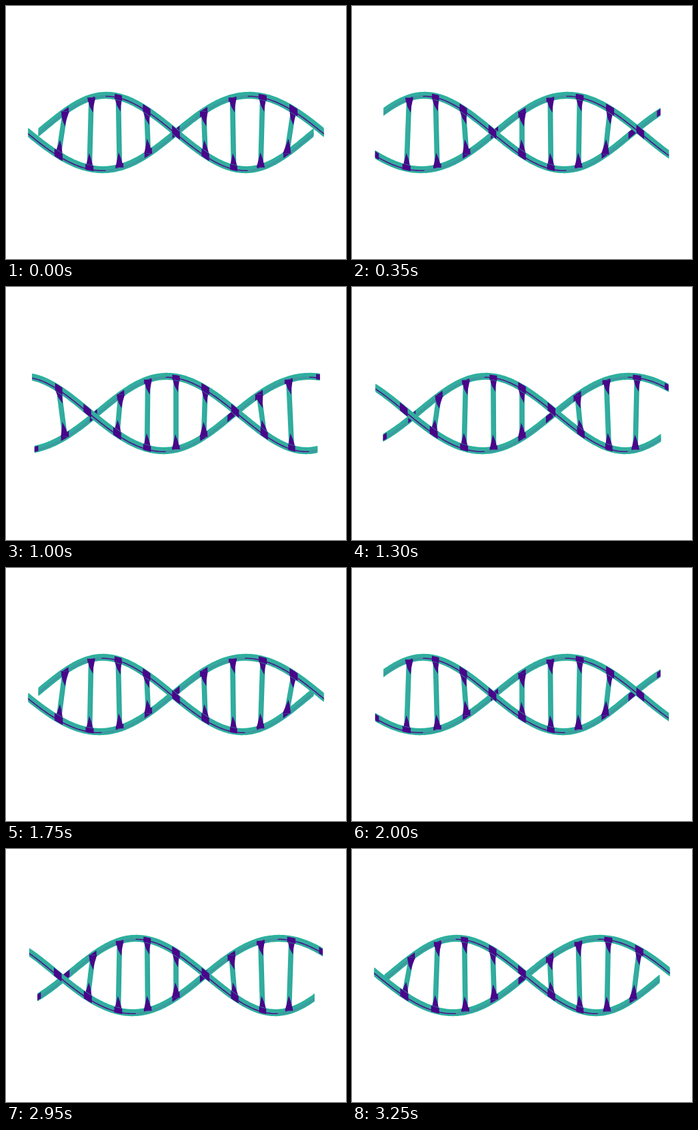
Write an HTML page with a canvas that moves like this. It is 498x371 px and loops after 3.3 s.

```html
<!DOCTYPE html>
<html lang="en">
<head>
<meta charset="utf-8">
<title>Rotating double helix</title>
<style>
html, body { margin: 0; width: 100%; height: 100%; overflow: hidden; background: #fff; }
canvas { display: block; }
</style>
</head>
<body>
<canvas id="stage" width="498" height="371"></canvas>
<script>
const ctx = document.getElementById('stage').getContext('2d');

const LOOP = 3300, STEP = 50;
const CX = 249, CY = 185.5;
const LENGTH = 418, HALF = LENGTH / 2, PITCH = LENGTH / 10;
const RADIUS = 54.5, TUBE = 5.1, DEPTH = 0.036;
const K = 2 * Math.PI / LENGTH;
const TEAL = '#32ad9f', EDGE = '#27b59c', SHADE = '#3d9a9f', PURPLE = '#48068a';

// time in ms, distance the wave has travelled to the left
const TRAVEL = [[0, 0], [700, 81], [1300, 160], [1750, 214], [2000, 251], [2600, 331], [LOOP, LENGTH]];

function travelAt(t) {
  const i = TRAVEL.findIndex(key => key[0] > t);
  const [t0, d0] = TRAVEL[i - 1], [t1, d1] = TRAVEL[i];
  return d0 + (d1 - d0) * (t - t0) / (t1 - t0);
}

// Point of a strand (0 or 1) at axis position s, seen in perspective
function project(s, strand, travel) {
  const a = K * (s + travel) + strand * Math.PI;
  const sin = Math.sin(a), cos = Math.cos(a);
  const p = 1 + DEPTH * cos;
  const slope = RADIUS * K * cos;
  return {
    x: CX + s * p,
    y: CY + RADIUS * sin * p,
    h: TUBE * p * Math.sqrt(1 + slope * slope),
    sin, cos
  };
}

const isFront = p => p.cos >= 0;

function polygon(points, color) {
  ctx.fillStyle = color;
  ctx.beginPath();
  points.forEach(([x, y]) => ctx.lineTo(x, y));
  ctx.fill();
}

// Fills a ribbon between two offsets, given as fractions of the tube's half height
function band(points, from, to, color) {
  const side = f => points.map(p => [p.x, p.y + p.h * f]);
  polygon([...side(from), ...side(to).reverse()], color);
}

function sample(from, to, strand, travel) {
  const points = [];
  const n = Math.ceil((to - from) / 2);
  for (let i = 0; i <= n; i++) points.push(project(from + (to - from) * i / n, strand, travel));
  return points;
}

function drawRun(run, front) {
  if (run.length < 2) return;
  band(run, -1, 1, EDGE);
  band(run, -0.8, 0.8, TEAL);
  band(run, 0, 0.65, SHADE);
  if (front) band(run, 0.15, 0.4, PURPLE);
}

function drawStrand(strand, front, travel) {
  let run = [];
  for (const p of sample(-HALF, HALF, strand, travel)) {
    if (isFront(p) === front) {
      run.push(p);
    } else if (run.length) {
      drawRun([...run, p], front);
      run = [];
    }
  }
  drawRun(run, front);
}

function drawJoints(strand, front, travel) {
  for (let i = -4; i <= 4; i++) {
    const s = i * PITCH, c = project(s, strand, travel);
    if (isFront(c) !== front) continue;
    const inner = c.sin > 0 ? -1 : 1;
    const reach = Math.max(-0.85, (front ? -0.3 : 0.3) - Math.abs(c.cos));
    band(sample(s - 5.5, s + 5.5, strand, travel), inner * 0.9, inner * reach, PURPLE);
  }
  // dark cut faces at lower left and upper right
  for (const side of [-1, 1]) {
    const s = side * HALF, end = project(s, strand, travel);
    if (isFront(end) !== front || -side * end.sin < 0.4) continue;
    const inside = s - side * 5;
    band(sample(Math.min(s, inside), Math.max(s, inside), strand, travel), -0.75, 0.75, PURPLE);
  }
}

function drawRung(i, travel) {
  const a = project(i * PITCH, 0, travel), b = project(i * PITCH, 1, travel);
  const [top, low] = a.y < b.y ? [a, b] : [b, a];
  const len = low.y - top.y;
  if (len < 16) return;
  const at = (f, dx) => [top.x + (low.x - top.x) * f + dx, top.y + len * f];
  const bar = (l, r, color) => polygon([at(0, l), at(0, r), at(1, r), at(1, l)], color);
  bar(-3.8, 3.8, EDGE);
  bar(-2.8, 2.8, TEAL);
  bar(2, 2.8, SHADE);
  const f = Math.min(22, len * 0.35) / len;
  polygon([at(0, -6), at(0, 6), at(f * 0.6, 3.6), at(f, 3), at(f * 0.6, -2)], PURPLE);
  polygon([at(1, -6), at(1, 6), at(1 - f * 0.6, 2.4), at(1 - f, -1), at(1 - f * 0.6, -3)], PURPLE);
}

function draw(t) {
  const travel = travelAt(t);
  ctx.fillStyle = '#fff';
  ctx.fillRect(0, 0, 498, 371);
  for (const front of [false, true]) {
    for (const strand of [0, 1]) {
      drawStrand(strand, front, travel);
      drawJoints(strand, front, travel);
    }
    if (!front) for (let i = -4; i <= 4; i++) drawRung(i, travel);
  }
}

const start = performance.now();
function tick() {
  const t = (performance.now() - start) % LOOP;
  draw(Math.floor(t / STEP) * STEP);
  requestAnimationFrame(tick);
}
tick();
</script>
</body>
</html>
```
